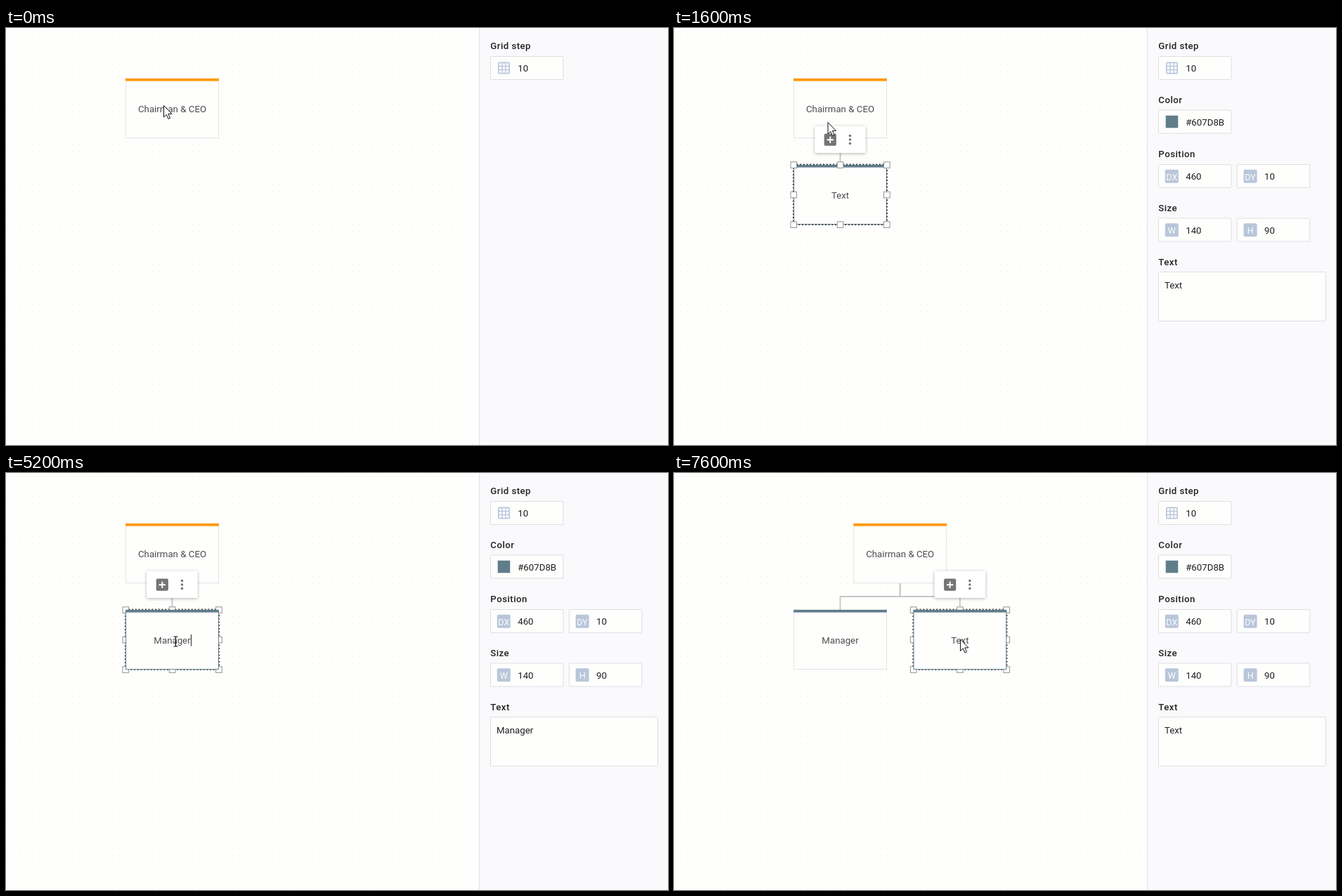
These frames come from a looping animation (942 by 594 pixels, 8000 ms). An HTML page:

```html
<!DOCTYPE html>
<html lang="en">
<head>
<meta charset="utf-8">
<title>Org chart editor</title>
<style>
  html, body { margin: 0; width: 100%; height: 100%; overflow: hidden; background: #fefefc; }
  svg { display: block; width: 942px; height: 594px; font: 400 13.25px Roboto, Arial, sans-serif; }
  .label { font-weight: 500; letter-spacing: .45px; fill: #222; }
  .value { fill: #1f1f1f; }
  .badge { font-size: 12.5px; fill: #fefefe; text-anchor: middle; }
  .title { fill: #4c4c4c; text-anchor: middle; }
  .field { fill: #fefefd; stroke: #dfdfe1; }
  .icon { fill: #b9c6da; }
  .handle { fill: #fff; stroke: #939393; }
  .bar { filter: drop-shadow(0 1px 2px rgba(0, 0, 0, .3)); }
  .link { fill: none; stroke: #c6c6c6; stroke-width: 1.8; }
  .pointer { fill: #fff; stroke: #111; stroke-linejoin: round; }
</style>
</head>
<body>
<svg viewBox="0 0 942 594">
  <defs>
    <pattern id="dots" width="9.47" height="9.47" y="5" patternUnits="userSpaceOnUse">
      <rect width="1" height="1" fill="#e9e9ea"/>
    </pattern>
  </defs>
  <rect width="942" height="594" fill="#fefefc"/>
  <rect width="673" height="594" fill="url(#dots)"/>
  <g id="chart"></g>
  <rect x="673" width="269" height="594" fill="#fafafd"/>
  <rect x="673" width="1" height="594" fill="#e3e3e8"/>
  <g id="panel"></g>
  <g id="pointer"></g>
</svg>
<script>
const LOOP = 8000, STEP = 200;
const W = 132.6, H = 85, ORANGE = '#FF9800', SLATE = '#607D8B';
const $ = id => document.getElementById(id);

const text = (cls, x, mid, s) => `<text class="${cls}" x="${x}" y="${mid + 4.7}">${s}</text>`;
const rect = (x, y, w, h, attrs) => `<rect x="${x}" y="${y}" width="${w}" height="${h}" ${attrs}/>`;

// Each entry changes part of the state and holds until the next one.
const timeline = [
  [0, { kids: 0, sel: '', shape: 'arrow', at: [224.5, 110.5], hover: 0, raised: 0, edit: 0, toggle: 0, name: 'Text' }],
  [600, { sel: 'ceo' }],
  [800, { at: [224.5, 78] }],
  [1000, { shape: 'hand', at: [224.5, 40.5], hover: 1 }],
  [1400, { kids: 1, sel: 'kid1', shape: 'arrow', at: [221, 82], hover: 0 }],
  [1600, { at: [219, 134.5] }],
  [1800, { at: [227, 184] }],
  [2000, { at: [236, 226], raised: 1 }],
  [2200, { at: [240, 237] }],
  [2400, { shape: 'beam', at: [241.5, 240], edit: 1 }],
  [2600, { name: 'Te' }],
  [2800, { name: '' }],
  [3400, { name: 'M' }],
  [3600, { name: 'Ma' }],
  [4000, { name: 'Man' }],
  [4200, { name: 'Mana' }],
  [4400, { name: 'Manag' }],
  [4600, { name: 'Manage' }],
  [5200, { name: 'Manager' }],
  [5400, { shape: 'arrow', at: [239, 214] }],
  [5600, { at: [228, 136], edit: 0, raised: 0 }],
  [5800, { at: [223.5, 107.5], sel: 'ceo', toggle: 1 }],
  [6200, { at: [223.5, 78] }],
  [6400, { shape: 'hand', at: [224.5, 40.5], hover: 1 }],
  [6600, { kids: 2, sel: 'kid2', shape: 'arrow', at: [228, 48], hover: 0, toggle: 0 }],
  [6800, { at: [272, 98] }],
  [7000, { at: [338, 172] }],
  [7200, { at: [394, 226], raised: 1 }],
  [7400, { at: [407.5, 237] }]
];

const stateAt = t => Object.assign({}, ...timeline.filter(([start]) => start <= t).map(([, change]) => change));

function nodesOf(s) {
  const nodes = { ceo: { x: s.kids > 1 ? 255.4 : 170.2, y: 72, color: ORANGE, name: 'Chairman &amp; CEO' } };
  if (s.kids) nodes.kid1 = { x: 170.2, y: 195, color: SLATE, name: s.name };
  if (s.kids > 1) nodes.kid2 = { x: 340.6, y: 195, color: SLATE, name: 'Text' };
  return nodes;
}

function card(n, selected) {
  const stroke = selected ? n.color : '#e3e3e4';
  return rect(n.x + .4, n.y + .5, W - .8, H - .8, `fill="#fefefd" stroke="${stroke}"`) +
    rect(n.x, n.y - .2, W, 3.8, `fill="${n.color}"`) +
    text('title', n.x + W / 2, n.y + 43.5, n.name);
}

const dotted = n => rect(n.x - .4, n.y - .6, W + .8, H + .8,
  'fill="none" stroke="#383838" stroke-width="1.7" stroke-dasharray="1.9 2.8"');

function handles(n) {
  let out = '';
  for (let i = 0; i < 9; i++) {
    if (i === 4) continue;
    const x = n.x + W / 2 * (i % 3), y = n.y + H / 2 * Math.floor(i / 3);
    out += rect(x - 4.2, y - 4.2, 8.6, 8.6, 'class="handle"');
  }
  return out;
}

function toolbar(n, hover) {
  const dots = [-5.5, 0, 5.5].map(d => `<circle cx="50.3" cy="${19.5 + d}" r="1.8" fill="#757575"/>`).join('');
  return `<g transform="translate(${n.x + 30} ${n.y - 55.5})">` +
    rect(0, 0, 72.5, 38.5, 'rx="1" fill="#fff" class="bar"') +
    rect(13.5, 11, 17.2, 17.2, `rx="2" fill="${hover ? '#3d87ea' : '#757578'}"`) +
    '<path d="M22.1 15v9.4M17.4 19.7h9.4" stroke="#fff" stroke-width="1.9"/>' + dots + '</g>';
}

function links(s, nodes) {
  const drop = kid => `M${nodes.ceo.x + W / 2} 157V176H${kid.x + W / 2}V195`;
  return Object.values(nodes).slice(1).map(kid => `<path class="link" d="${drop(kid)}"/>`).join('');
}

function drawChart(s, nodes) {
  const sel = nodes[s.sel];
  let out = links(s, nodes);
  for (const n of Object.values(nodes)) if (n !== sel) out += card(n);
  if (sel) {
    const frame = dotted(sel) + handles(sel);
    const toggle = s.toggle ? `<circle cx="${sel.x + W / 2}" cy="157" r="9.6" fill="${SLATE}"/>` : '';
    out += s.raised ? frame + card(sel, true) : card(sel, true) + toggle + frame;
    out += toolbar(sel, s.hover);
  }
  $('chart').innerHTML = out;
  if (s.edit) {
    const title = [...$('chart').querySelectorAll('.title')].pop();
    const x = sel.x + W / 2 + title.getComputedTextLength() / 2 + .3;
    $('chart').innerHTML += rect(x, 230, 1, 16.5, 'fill="#222"');
  }
}

const field = (x, y, w = 103.5, h = 33) => rect(x, y, w, h, 'rx="1" class="field"');

const number = (x, y, tag, value) => field(x, y) + rect(x + 9.3, y + 7.3, 19, 19, 'rx="2" class="icon"') +
  text('badge', x + 18.8, y + 17.7, tag) + text('value', x + 38.7, y + 17.2, value);

function gridIcon(x, y) {
  let out = rect(x, y, 17, 17, 'rx="2" class="icon"');
  for (let i = 0; i < 9; i++)
    out += rect(x + 1.7 + i % 3 * 5, y + 1.7 + Math.floor(i / 3) * 5, 3.6, 3.6, 'fill="#fefefd"');
  return out;
}

function drawPanel(n) {
  const label = (mid, s) => text('label', 689.3, mid, s);
  let out = label(25.5, 'Grid step') + field(689.5, 40.5) + gridIcon(700, 48.5) + text('value', 728.2, 57.7, 10);
  if (n) out += label(102.3, 'Color') + field(689.5, 117) +
    rect(699.5, 124.5, 18, 18, `fill="${n.color}" stroke="#dcdfe2" stroke-width=".8"`) +
    text('value', 728.2, 134.2, n.color) +
    label(179.7, 'Position') + number(689.5, 194.5, 'DX', 460) + number(801.3, 194.5, 'DY', 10) +
    label(256.5, 'Size') + number(689.5, 271, 'W', 140) + number(801.3, 271, 'H', 90) +
    label(333, 'Text') + field(689.5, 347.5, 238, 70) + text('value', 698, 366.2, n.name);
  $('panel').innerHTML = out;
}

const pointers = {
  arrow: '<path class="pointer" d="M0 0V16.4L3.8 12.9 6.5 19 9 17.9 6.4 11.9H11.6Z"/>',
  hand: '<path class="pointer" stroke-width="1.2" d="M-1.7 13V1.6Q-1.7 0 0 0T1.8 1.6V8' +
    'Q2 6.7 3.4 6.8T5 8.4Q5.3 7.4 6.5 7.6T7.8 9.2Q9.8 8.4 9.9 10.6V14.6' +
    'Q9.9 17.4 8 19V21.5H-1V19.4L-6.6 12.6Q-7.6 11 -6.4 10.2T-3.8 10.8Z"/>' +
    '<path d="M1.8 8v3M5 8.4v3M7.8 9.2v2.6" stroke="#111" stroke-width="1.1"/>',
  beam: '<path fill="none" stroke="#111" stroke-width="1.2" d="M-3 -7H-1Q0 -7 0 -6Q0 -7 1 -7H3M0 -6V6M-3 7H-1Q0 7 0 6Q0 7 1 7H3M-1.5 2H1.5"/>'
};

let shown = -1;
function tick() {
  const t = Math.floor(performance.now() % LOOP / STEP) * STEP;
  if (t !== shown) {
    shown = t;
    const s = stateAt(t), nodes = nodesOf(s);
    drawChart(s, nodes);
    drawPanel(nodes[s.sel]);
    $('pointer').innerHTML = `<g transform="translate(${s.at})">${pointers[s.shape]}</g>`;
  }
  requestAnimationFrame(tick);
}
tick();
</script>
</body>
</html>
```
